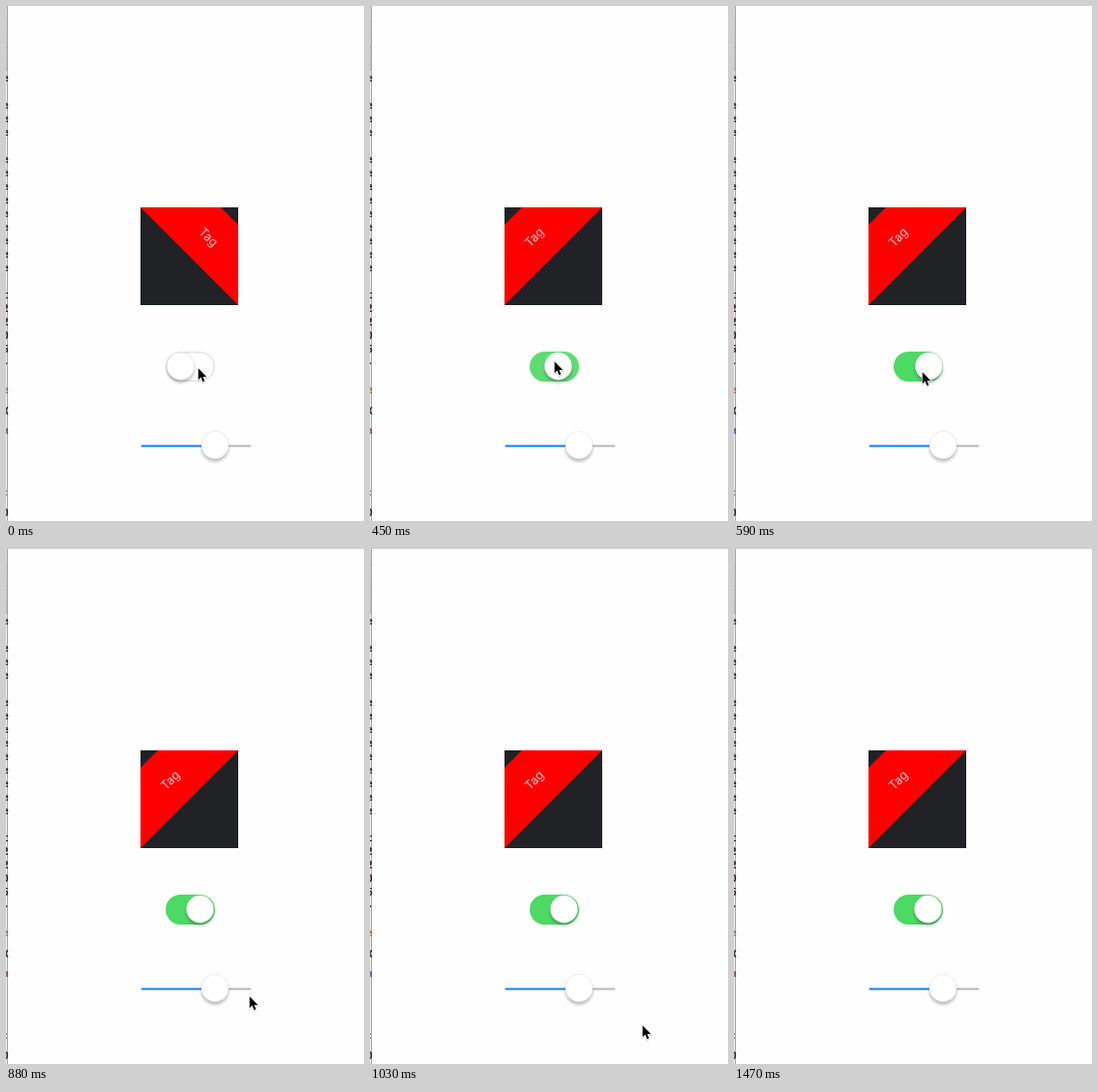
An HTML page that plays this animation: 370x532 px, repeating every 1.62 s.

```html
<!DOCTYPE html>
<html lang="en">
<head>
<meta charset="utf-8">
<title>Tag switch</title>
<style>
  html, body { margin: 0; width: 100%; height: 100%; overflow: hidden; background: #fefefe; }
  svg { display: block; width: 100%; height: 100%; }
  .tag { font: 300 12.5px Inter, Roboto, sans-serif; fill: #fff; text-anchor: middle; }
  .code { font: bold 11px "DejaVu Sans Mono", monospace; text-anchor: end; }
  .knob { fill: #fff; stroke: #000; stroke-opacity: .16; stroke-width: .5; filter: url(#lift); }
</style>
</head>
<body>
<svg viewBox="0 0 370 532">
  <defs>
    <filter id="lift" x="-40%" y="-40%" width="180%" height="190%">
      <feDropShadow dx="0" dy="3" stdDeviation="1.6" flood-opacity=".25"/>
    </filter>
    <filter id="soft" x="-40%" y="-40%" width="180%" height="190%">
      <feDropShadow dx="0" dy="1" stdDeviation=".7" flood-opacity=".25"/>
    </filter>
    <linearGradient id="bar" x2="0" y2="1">
      <stop stop-color="#d8d8d8"/><stop offset="1" stop-color="#bcbcbc"/>
    </linearGradient>
    <clipPath id="edge"><rect width="2.5" height="532"/></clipPath>
  </defs>

  <!-- sliver of the editor window behind -->
  <g id="editor" clip-path="url(#edge)">
    <rect width="2" height="532" fill="#f0f0f0"/>
    <rect width="2" height="66" fill="url(#bar)"/>
    <path d="M0 16.5h2M0 42.5h2M0 66.5h2" stroke="#a8a8a8"/>
    <path d="M1.5 0V532" stroke="#a4a4a4"/>
  </g>

  <rect x="139" y="208" width="101" height="101" fill="#202225"/>
  <g id="ribbon">
    <path d="M139 208H222L240 226V309Z" fill="#f00"/>
  </g>
  <text class="tag" id="label" y="4">Tag</text>

  <rect id="track" x="165.75" y="357.75" width="49.5" height="29.5" rx="14.75" stroke-width="1.5"/>
  <circle class="knob" id="thumb" cy="372" r="14.2"/>

  <g stroke-width="2" stroke-linecap="round">
    <path d="M140.5 454.5H216" stroke="#0f80fb"/>
    <path d="M216 454.5H252.5" stroke="#b7b7b7"/>
  </g>
  <circle class="knob" cx="216" cy="453.5" r="14.2"/>

  <path id="cursor" d="M0 0V12L2.8 9.4 4.7 14 6.7 13.2 4.8 8.7H8.6Z"
        stroke="#fff" stroke-width="1.4" paint-order="stroke" filter="url(#soft)"/>
</svg>
<script>
const LOOP = 1620;
const el = id => document.getElementById(id);

// Each list holds [start time, values...]; a value stays until the next entry.
const cursorSteps = [
  [0, 198.7, 374.2], [150, 190.7, 367.2], [590, 194.7, 378.2],
  [740, 250.7, 460.2], [880, 251.7, 462.2], [1030, 281.7, 492.2],
  [1180, 317.7, 520.2], [1330, 335.7, 529.2], [1470, 400, 600]
];
const switchSteps = [
  [0, 180.5, '#fefefe', '#e3e3e3'],
  [450, 194.5, '#5edc74', '#5edc74'],
  [590, 201.5, '#4cd964', '#4cd964'],
  [740, 200.5, '#4cd964', '#4cd964']
];
const stepAt = (steps, t) => steps.filter(s => s[0] <= t).pop().slice(1);

function addGlyph(char, y, color = '#2b1c14') {
  const text = document.createElementNS('http://www.w3.org/2000/svg', 'text');
  text.setAttribute('class', 'code');
  text.setAttribute('x', 2.8);
  text.setAttribute('y', y + 4);
  text.setAttribute('fill', color);
  text.textContent = char;
  el('editor').append(text);
}
[...'e eee eeeeeeeee t2206-'].forEach((char, i) => addGlyph(char, 74 + 14 * i));
addGlyph('e', 396, '#a8622c');
addGlyph('X', 418);
addGlyph('a', 438, '#7040a8');
addGlyph(':', 502);
addGlyph('0', 523);

function draw(t) {
  const [x, y] = stepAt(cursorSteps, t);
  el('cursor').setAttribute('transform', `translate(${x} ${y})`);

  const [thumbX, fill, border] = stepAt(switchSteps, t);
  el('thumb').setAttribute('cx', thumbX);
  el('track').setAttribute('fill', fill);
  el('track').setAttribute('stroke', border);

  const on = t >= 450;
  el('ribbon').setAttribute('transform', on ? 'translate(379 0) scale(-1 1)' : '');
  el('label').setAttribute('transform',
    on ? 'translate(170 239) rotate(-45)' : 'translate(209 239) rotate(45)');
}

function tick() {
  draw(performance.now() % LOOP);
  requestAnimationFrame(tick);
}
tick();
</script>
</body>
</html>
```
